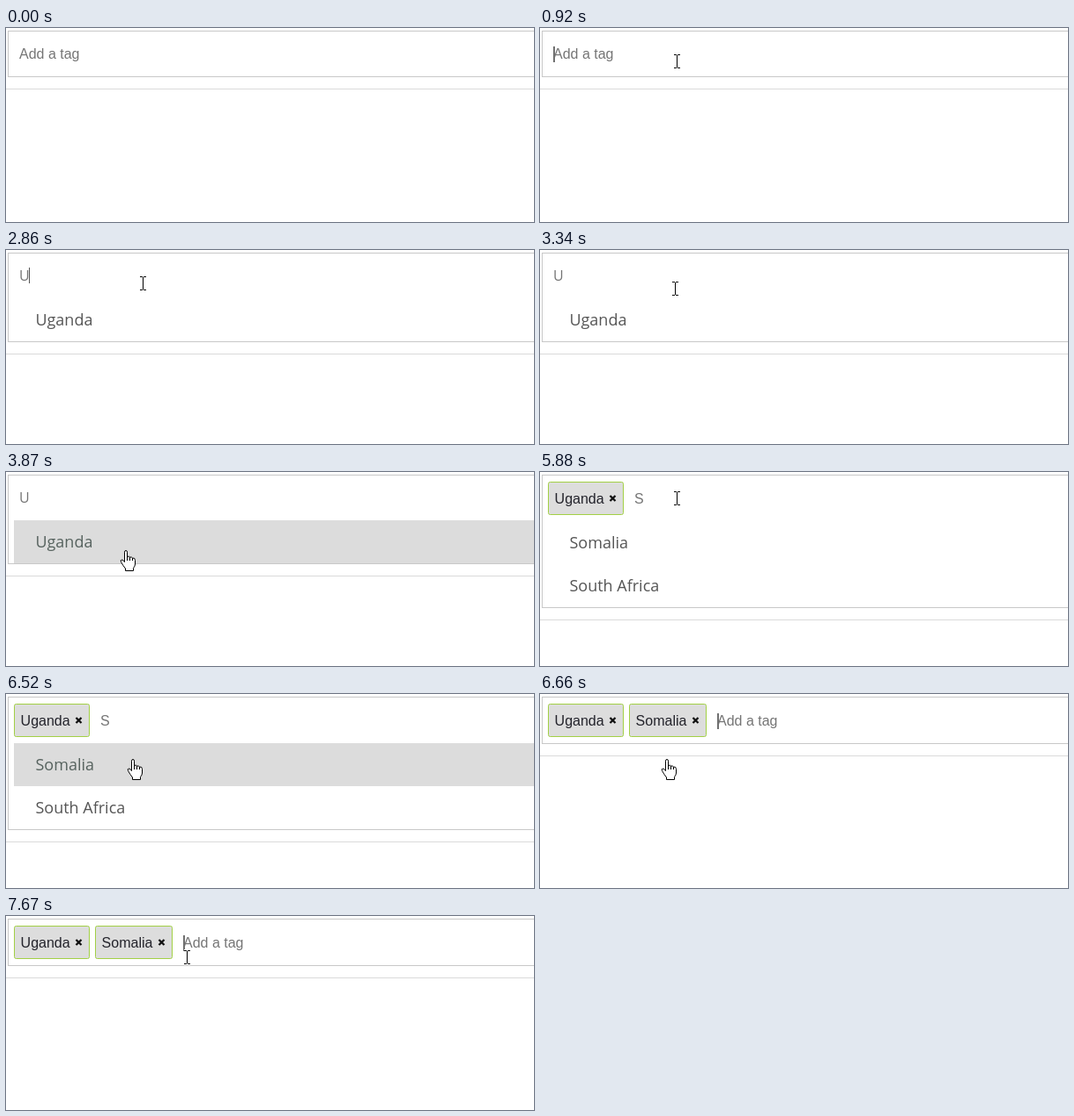
An HTML page that plays this animation: 599 px wide and 221 px high, repeating every 8000 ms.

```html
<!DOCTYPE html>
<html lang="en">
<head>
<meta charset="utf-8">
<title>Tag input</title>
<style>
  html, body { margin: 0; width: 100%; height: 100%; overflow: hidden; background: #fff; }
  svg { display: block; }
  .sans { font: 16px "Liberation Sans", Arial, sans-serif; }
  .open { font: 16px "Open Sans", sans-serif; }
  .option { font: 18px "Open Sans", sans-serif; fill: #555; }
  .hint, .typed { fill: #757575; }
  .tag { fill: #23232b; }
</style>
</head>
<body>
<svg width="599" height="221" viewBox="0 0 599 221">
  <g id="scene"></g>
  <g id="pointer"></g>
</svg>
<script>
const LOOP = 8000;
const scene = document.getElementById('scene');
const pointer = document.getElementById('pointer');

// What the field holds, from each time on
const states = [
  { at: 0, tags: [], typed: '', options: [] },
  { at: 1850, tags: [], typed: 'U', options: ['Uganda'] },
  { at: 3950, tags: ['Uganda'], typed: '', options: [] },
  { at: 5340, tags: ['Uganda'], typed: 'S', options: ['Somalia', 'South Africa'] },
  { at: 6660, tags: ['Uganda', 'Somalia'], typed: '', options: [] }
];

const caretOn = [
  [920, 1470], [1850, 2400], [2860, 3340], [3950, 4500],
  [5040, 5880], [6430, 6520], [6660, 7210], [7670, LOOP]
];

// Pointer moves: first step, last step, number of steps, end point
const moves = [
  [210, 210, 1, 331, 159],
  [289, 840, 8, 155, 38],
  [3340, 3640, 5, 140, 96],
  [3810, 3870, 2, 135, 89],
  [4270, 4500, 4, 155, 30],
  [6110, 6280, 3, 143, 74],
  [6810, 7210, 6, 205, 47]
];

// The hand stays until the mouse moves again after a pick
const heldHand = [[3950, 4270], [6660, 6810]];

const tagBox = { Uganda: [9, 86], Somalia: [101, 88] };

const ibeam = 'M-3-7.5H0M1-7.5H4M.5-7V7M-3 7.5H0M1 7.5H4';
const shapes = {
  arrow: '<path d="M.5 .5V16.5L4.2 13L6.8 18.6L9.2 17.6L6.7 12H11.5Z" fill="#fff" stroke="#000"/>',
  beam: `<path d="${ibeam}" fill="none" stroke="#fff" stroke-width="3"/>
    <path d="${ibeam}" fill="none" stroke="#000"/>`,
  hand: `<path d="M-.5 2.2Q-.5 .5 1 .5Q2.5 .5 2.5 2.2V7.5Q4.5 6.5 5.5 8Q7.5 7.5 8.5 9Q11.5 8.5 11.5 11.5V16
    Q11.5 18 9.5 20.5V23.5H.5V21Q-2 18-4.5 13.5Q-5.5 11-3.5 11Q-2 11-.5 13.5Z" fill="#fff" stroke="#000"
    stroke-linejoin="round"/><path d="M2.5 7V12M5.5 8V12M8.5 9V12" stroke="#000"/>`
};

const within = (spans, t) => spans.some(([a, b]) => t >= a && t < b);
const ease = p => p * p * (3 - 2 * p);
const rect = (x, y, w, h, fill) => `<rect x="${x}" y="${y}" width="${w}" height="${h}" fill="${fill}"/>`;
const text = (x, y, cls, str, extra = '') => `<text x="${x}" y="${y}" class="${cls}" ${extra}>${str}</text>`;

function pointerAt(t) {
  let pos = null;
  for (const [from, to, n, x, y] of moves) {
    if (t < from) break;
    const gap = n > 1 ? (to - from) / (n - 1) : 1;
    const step = Math.min(n, Math.floor((t - from) / gap + 1e-6) + 1);
    const p = ease(step / n);
    pos = pos
      ? { x: pos.x + (x - pos.x) * p, y: pos.y + (y - pos.y) * p }
      : { x, y };
  }
  return pos && { x: Math.round(pos.x), y: Math.round(pos.y) };
}

function drawTag(name) {
  const [x, w] = tagBox[name];
  const cx = x + w - 12.5;
  return `<rect x="${x + .5}" y="11.5" width="${w - 1}" height="37" rx="2" fill="#ddd" stroke="#a2d045"/>`
    + text(x + 7.6, 36, 'sans tag', name)
    + `<path d="M${cx - 3} 27l6 6m0-6l-6 6" stroke="#111" stroke-width="2.3"/>`;
}

function drawScene({ tags, typed, options }, hover, caret) {
  const drop = tags.length ? 1 : 0;
  const rowTop = 55 + drop;
  const bottom = rowTop + 49 * options.length;
  const last = tags[tags.length - 1];
  const left = last ? tagBox[last][0] + tagBox[last][1] + 12 : 15;

  let out = rect(2, 3, 597, 1, '#c8c8c8') + rect(2, 3, 1, bottom - 2, '#c8c8c8');
  if (hover) out += rect(9, rowTop, 590, 49, '#dcdcdc');
  out += rect(2, bottom, 597, 1, '#c8c8c8') + rect(0, bottom + 14, 599, 1, '#dadada');
  out += tags.map(drawTag).join('');

  options.forEach((name, i) => {
    const tint = hover && i === 0 ? 'style="fill:#56625e"' : '';
    out += text(33.4, rowTop + 31 + 49 * i, 'option', name, tint);
  });

  out += typed
    ? text(left, 35 + drop, (last ? 'sans' : 'open') + ' typed', typed)
    : text(left, 35 + drop, 'sans hint', 'Add a tag');

  if (caret) {
    out += typed
      ? rect(left + (last ? 10 : 11), 20 + drop, 1, 18, '#555')
      : rect(left, 21 + drop, 2, 18, '#707070');
  }
  return out;
}

let shownScene = '', shownShape = '';

function render(t) {
  const state = states.filter(s => s.at <= t).pop();
  const pos = pointerAt(t);
  const fieldEnd = state.tags.length ? 56 : 55;
  const hover = !!pos && state.options.length > 0 && pos.y >= fieldEnd;

  const markup = drawScene(state, hover, within(caretOn, t));
  if (markup !== shownScene) scene.innerHTML = shownScene = markup;

  let shape = '';
  if (pos) {
    const kind = hover || within(heldHand, t) ? 'hand' : pos.y <= fieldEnd ? 'beam' : 'arrow';
    shape = shapes[kind];
    pointer.setAttribute('transform', `translate(${pos.x} ${pos.y})`);
  }
  if (shape !== shownShape) pointer.innerHTML = shownShape = shape;
}

let start = null;
function tick(now) {
  if (start === null) start = now;
  render((now - start) % LOOP);
  requestAnimationFrame(tick);
}
render(0);
requestAnimationFrame(tick);
</script>
</body>
</html>
```
